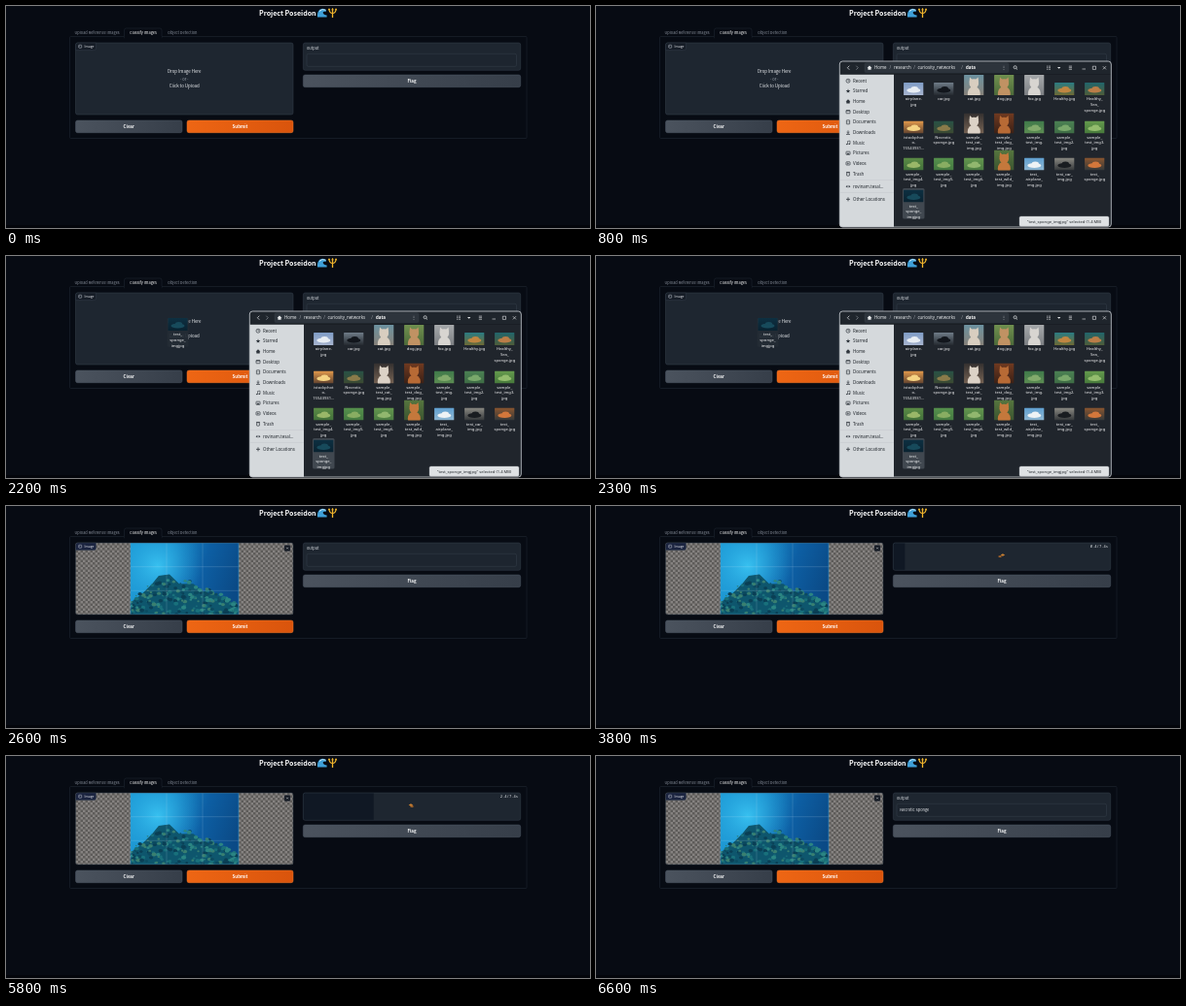
An HTML page with a canvas for the animation above (8.5 s loop, 600 by 229 pixels).

```html
<!DOCTYPE html>
<html lang="en">
<head>
<meta charset="utf-8">
<title>Project Poseidon</title>
<style>
html, body { margin: 0; width: 100%; height: 100%; overflow: hidden; background: #070b13; }
canvas { display: block; width: 600px; height: 229px; }
</style>
</head>
<body>
<canvas id="stage"></canvas>
<script>
const W = 600, H = 229, LOOP = 8500;
const canvas = document.getElementById('stage');
const dpr = window.devicePixelRatio || 1;
canvas.width = W * dpr;
canvas.height = H * dpr;
const c = canvas.getContext('2d');

const UI = '"Noto Sans CJK JP", "Noto Sans CJK SC", "Noto Sans", sans-serif';
const SYS = '"Noto Sans", "Open Sans", sans-serif';

const OPEN = 800, DRAG = 1700, HOVER = 2200, DROP = 2500, RUN = 3400, DONE = 6600, ETA = 7.4;

function rng(seed) {
  return () => (seed = (seed * 16807) % 2147483647) / 2147483647;
}

function text(s, x, y, size, color, { align = 'left', weight = 400, font = UI } = {}) {
  c.font = `${weight} ${size}px ${font}`;
  c.textAlign = align;
  c.fillStyle = color;
  c.fillText(s, x, y + size * 0.36);
}

function box(x, y, w, h, r, fill, stroke, lw = 0.5) {
  c.beginPath();
  c.roundRect(x, y, w, h, r);
  if (fill) { c.fillStyle = fill; c.fill(); }
  if (stroke) { c.strokeStyle = stroke; c.lineWidth = lw; c.stroke(); }
}

function poly(points, fill) {
  c.beginPath();
  points.forEach(([x, y]) => c.lineTo(x, y));
  c.closePath();
  c.fillStyle = fill;
  c.fill();
}

function line(points, color, lw = 0.6) {
  c.beginPath();
  points.forEach(([x, y], i) => i ? c.lineTo(x, y) : c.moveTo(x, y));
  c.strokeStyle = color;
  c.lineWidth = lw;
  c.stroke();
}

function disc(x, y, rx, ry, fill) {
  c.beginPath();
  c.ellipse(x, y, rx, ry, 0, 0, Math.PI * 2);
  c.fillStyle = fill;
  c.fill();
}

function ring(x, y, r, color, lw = 0.6) {
  c.beginPath();
  c.arc(x, y, r, 0, Math.PI * 2);
  c.strokeStyle = color;
  c.lineWidth = lw;
  c.stroke();
}

function shade(x0, y0, x1, y1, ...stops) {
  const g = c.createLinearGradient(x0, y0, x1, y1);
  stops.forEach((s, i) => g.addColorStop(i / (stops.length - 1), s));
  return g;
}

function clipped(x, y, w, h, r, draw) {
  c.save();
  c.beginPath();
  c.roundRect(x, y, w, h, r);
  c.clip();
  draw();
  c.restore();
}

function button(label, x, y, w, h, from, to, edge) {
  box(x, y, w, h, 2, shade(x, y, x + w, y + h, from, to), edge);
  text(label, x + w / 2, y + h / 2, 4.4, '#fff', { align: 'center', weight: 600 });
}

function wave(x, y) {
  c.beginPath();
  c.moveTo(x, y + 9);
  c.bezierCurveTo(x - 0.5, y + 2, x + 4, y - 1, x + 8.2, y + 1.6);
  c.bezierCurveTo(x + 9.6, y + 2.6, x + 9, y + 4.5, x + 7.6, y + 3.8);
  c.bezierCurveTo(x + 5, y + 3, x + 4.6, y + 7, x + 9.6, y + 7.4);
  c.lineTo(x + 9.6, y + 9.6);
  c.lineTo(x, y + 9.6);
  c.closePath();
  c.fillStyle = '#3f9fd8';
  c.fill();
  c.beginPath();
  c.moveTo(x + 2, y + 3.4);
  c.quadraticCurveTo(x + 4.5, y + 0.4, x + 8.4, y + 2.2);
  c.strokeStyle = '#d5f0fb';
  c.lineWidth = 0.9;
  c.stroke();
}

function trident(x, y) {
  const gold = '#f0b42c';
  line([[x, y + 0.5], [x, y + 10]], gold, 1.3);
  c.beginPath();
  c.moveTo(x - 3.5, y + 1);
  c.bezierCurveTo(x - 3.8, y + 7, x + 3.8, y + 7, x + 3.5, y + 1);
  c.strokeStyle = gold;
  c.lineWidth = 1.2;
  c.stroke();
  for (const d of [-3.5, 0, 3.5])
    poly([[x + d - 1.3, y + 2.2], [x + d, y], [x + d + 1.3, y + 2.2]], gold);
}

function page() {
  c.fillStyle = '#070b13';
  c.fillRect(0, 0, W, H);
  c.fillStyle = '#04060b';
  c.fillRect(0, 226, W, 3);

  text('Project Poseidon', 260, 7, 7.05, '#fff', { weight: 600 });
  wave(320, 2);
  trident(335.5, 2);

  const edge = '#222b36';
  box(65.5, 31.5, 469.5, 105, 1, null, edge);
  box(121.5, 23, 38.5, 10, [2, 2, 0, 0], '#070b13', edge);
  c.fillStyle = '#070b13';
  c.fillRect(121.8, 31, 37.9, 3);
  text('Upload Reference Images', 70.5, 27.3, 3.92, '#8b929e');
  text('Classify Images', 127, 27.3, 3.92, '#fff');
  text('Object Detection', 166, 27.3, 3.92, '#8b929e');

  button('Clear', 71.5, 118, 109.5, 12.7, '#4b535e', '#363e49', '#4b5563');
  button('Submit', 186, 118, 109, 12.7, '#ee6614', '#d9540c', '#f07828');
  button('Flag', 305.3, 71, 223.4, 12.7, '#4b535e', '#363e49', '#4b5563');
}

function chip(fill) {
  box(71.7, 38, 20.8, 7.6, [2, 0, 2, 0], fill, '#39434f', 0.4);
  box(74.7, 40.2, 3, 3, 0.5, null, '#c8ced8', 0.5);
  disc(75.7, 41.2, 0.4, 0.4, '#c8ced8');
  text('Image', 80.6, 41.8, 3.4, '#e5e7eb');
}

function dropZone() {
  box(71.5, 38, 223.5, 74, 2, '#1e2630', '#36404c');
  chip('#161d27');
  ['Drop Image Here', '- or -', 'Click to Upload'].forEach((s, i) =>
    text(s, 183.2, 67.7 + i * 7.5, i === 1 ? 4 : 4.4, i === 1 ? '#a3abb5' : '#eef0f3', { align: 'center' }));
}

function reef(x, y, w, h, seed) {
  c.fillStyle = shade(x, y, x + w, y + h * 0.5, '#1c9bd6', '#1b92cf', '#0d5fa4', '#0b4a86');
  c.fillRect(x, y, w, h);
  const glow = c.createRadialGradient(x + w * 0.25, y + h * 0.32, 0, x + w * 0.25, y + h * 0.32, w * 0.42);
  glow.addColorStop(0, 'rgba(60,200,245,.85)');
  glow.addColorStop(1, 'rgba(40,160,220,0)');
  c.fillStyle = glow;
  c.fillRect(x, y, w, h);
  poly([[0, 1], [0, 0.83], [0.1, 0.72], [0.2, 0.57], [0.26, 0.46], [0.36, 0.44], [0.45, 0.57],
    [0.58, 0.57], [0.68, 0.68], [0.82, 0.74], [1, 0.87], [1, 1]]
    .map(([u, v]) => [x + u * w, y + v * h]), '#0e566d');
  const rand = rng(seed), tones = ['#0a3f55', '#19707b', '#2b8583', '#0c4a60', '#397f70'];
  for (let i = 0; i < 210; i++) {
    const u = rand(), top = 0.49 + 1.3 * (u - 0.32) ** 2 * (u < 0.32 ? 2.4 : 0.65);
    const v = top + rand() * (1 - top), r = w * (0.008 + rand() * 0.015);
    disc(x + u * w, y + v * h, r, r * 0.8, tones[Math.floor(rand() * tones.length)]);
  }
}

function loadedImage() {
  clipped(71.5, 38, 223.5, 74, 2, () => {
    c.fillStyle = '#5d5b59';
    c.fillRect(71, 38, 225, 75);
    c.fillStyle = '#858280';
    const s = 2.5;
    for (let j = 0; j < 30; j++)
      for (let i = j % 2; i < 90; i += 2) c.fillRect(71.5 + i * s, 38 + j * s, s, s);
    clipped(128, 38, 111, 74, 0, () => reef(128, 38, 111, 74, 77));
    const guide = 'rgba(205,230,240,.4)';
    for (const k of [1, 2]) {
      line([[128 + 37 * k, 38], [128 + 37 * k, 112]], guide, 0.4);
      line([[128, 38 + 24.67 * k], [239, 38 + 24.67 * k]], guide, 0.4);
    }
    box(128, 38, 111, 74, 0, null, '#3b9fd0', 0.5);
  });
  box(71.5, 38, 223.5, 74, 2, null, '#36404c');
  chip('#1b2440');
  box(286, 40.5, 6, 6, 1, '#10151e', '#3d4652', 0.4);
  line([[288, 42.5], [290, 44.5]], '#dfe3e8', 0.5);
  line([[290, 42.5], [288, 44.5]], '#dfe3e8', 0.5);
}

function output(value) {
  box(305.3, 38, 223.4, 28.3, 2, '#1e2630', '#36404c');
  text('output', 309, 43.7, 3.92, '#e1e4e9');
  box(309, 49.3, 215.5, 13, 1.5, '#1d252f', '#36404c');
  if (value) text(value, 312.3, 55.7, 3.92, '#f0f2f5');
}

function loader(x, y, s) {
  const poses = [[1.4, 0.9], [-1.4, 0.9], [-1.4, 0], [1.4, 0]];
  const step = s / 0.45, n = Math.floor(step);
  const a = poses[(n + 3) % 4], b = poses[n % 4];
  const e = 1 - (1 - (step - n)) ** 3;
  const dx = a[0] + (b[0] - a[0]) * e, dy = a[1] + (b[1] - a[1]) * e;
  const tile = (px, py, fill) =>
    poly([[px - 2.3, py], [px, py - 1.2], [px + 2.3, py], [px, py + 1.2]], fill);
  tile(x - dx, y + 1.7 - dy, '#a7652a');
  tile(x + dx, y - 1.7 + dy, '#d18432');
}

function progress(s) {
  box(305.3, 38, 223.4, 28.3, 2, '#1e2630');
  clipped(305.3, 38, 223.4, 28.3, 2, () => {
    c.fillStyle = '#101824';
    c.fillRect(305.3, 38, 223.4 * s / ETA, 28.3);
  });
  box(305.3, 38, 223.4, 28.3, 2, null, '#36404c');
  text(`${s.toFixed(1)}/${ETA}s`, 526, 41.8, 3.8, '#e3e6ea',
    { align: 'right', font: '"Noto Sans Mono", "DejaVu Sans Mono", monospace' });
  loader(416.5, 51.3, s);
}

// label lines, top colour, bottom colour, subject colour, tall
const files = [
  ['airplane.|jpg', '#7f9cc6', '#a8b5cf', '#e8edf3'],
  ['car.jpg', '#6f7c88', '#252a30', '#12161c'],
  ['cat.jpg', '#6c92a0', '#88827a', '#d8cec0', 1],
  ['dog.jpg', '#70904f', '#4d6b3a', '#c09263', 1],
  ['fox.jpg', '#a6a9ab', '#7c7f83', '#d8d5d1', 1],
  ['Healthy.jpg', '#2a7c83', '#6d6a35', '#c08642'],
  ['Healthy_|Sea_|sponge.jpg', '#21666c', '#4e5c3a', '#ba7d48'],
  ['istockphot|o-|15543931...', '#e39a4b', '#62432f', '#f5d382'],
  ['Necrotic_|sponge.jpg', '#285246', '#3c4a32', '#8a7b4a'],
  ['sample_|test_cat_|img.jpg', '#34302f', '#756253', '#dcd2c6', 1],
  ['sample_|test_dog_|img.jpg', '#713a20', '#3a2016', '#b76a35', 1],
  ['sample_|test_img.|jpg', '#3f7a4a', '#5c8c52', '#82ab6c'],
  ['sample_|test_img2.|jpg', '#4b8153', '#3e6c45', '#79a86b'],
  ['sample_|test_img3.|jpg', '#659b4d', '#477a3b', '#93bd6d'],
  ['sample_|test_img4.|jpg', '#5c8c46', '#41703a', '#99b768'],
  ['sample_|test_img5.|jpg', '#56914d', '#447a41', '#88ad62'],
  ['sample_|test_img6.|jpg', '#64974f', '#4b7c42', '#91b76e'],
  ['sample_|test_wild_|img.jpg', '#56763f', '#3b5430', '#c4783c', 1],
  ['test_|airplane_|img.jpg', '#5f9fd0', '#8fb7d2', '#eef2f5'],
  ['test_car_|img.jpg', '#8b8a83', '#34373a', '#191c20'],
  ['test_|sponge.jpg', '#8c562f', '#33383a', '#d3773b'],
  ['test_|sponge_|imgjpg', '#0d3042', '#0a2230', '#174a5b']
];
const rowBase = [92, 131.5, 169.5, 202.5];

function fileIcon([label, top, bottom, subject, tall], x, base) {
  const h = tall ? 21 : 13, w = 20.5, y = base - h;
  clipped(x - w / 2, y, w, h, 0.6, () => {
    c.fillStyle = shade(0, y, 0, base, top, bottom);
    c.fillRect(x - w / 2, y, w, h);
    if (tall) {
      disc(x, base - 2, 6.5, 7, subject);
      disc(x, y + 9, 4.8, 4.8, subject);
      for (const s of [-1, 1])
        poly([[x + s * 4.8, y + 8], [x + s * 4.3, y + 2.5], [x + s * 1, y + 5.5]], subject);
    } else {
      disc(x, y + 8, 7, 2.4, subject);
      disc(x + 1, y + 6, 3.6, 2, subject);
    }
  });
  label.split('|').forEach((s, i) =>
    text(s, x, base + 3.6 + i * 5.8, 4.15, '#f1f2f3', { align: 'center', font: SYS }));
}

function sideIcon(kind, x, y) {
  const ink = '#30363d';
  const strokeBox = () => box(x - 2, y - 1.6, 4, 3.2, 0.4, null, ink, 0.7);
  switch (kind) {
    case 'Recent':
      ring(x, y, 2, ink, 0.7);
      line([[x, y - 1.2], [x, y], [x + 1, y]], ink);
      break;
    case 'Starred':
      poly(Array.from({ length: 10 }, (_, i) => {
        const a = i * Math.PI / 5 - Math.PI / 2, r = i % 2 ? 1 : 2.4;
        return [x + r * Math.cos(a), y + r * Math.sin(a)];
      }), ink);
      break;
    case 'Home':
      poly([[x - 2.4, y], [x, y - 2.2], [x + 2.4, y], [x + 1.7, y], [x + 1.7, y + 2], [x - 1.7, y + 2], [x - 1.7, y]], ink);
      break;
    case 'Documents':
      box(x - 1.6, y - 2, 3.2, 4, 0.3, null, ink, 0.7);
      line([[x - 0.8, y], [x + 0.8, y]], ink, 0.4);
      break;
    case 'Downloads':
      line([[x, y - 2], [x, y + 1]], ink, 0.8);
      line([[x - 1.4, y - 0.3], [x, y + 1], [x + 1.4, y - 0.3]], ink, 0.7);
      line([[x - 2, y + 2], [x + 2, y + 2]], ink, 0.7);
      break;
    case 'Music':
      disc(x - 1.2, y + 1.5, 0.9, 0.7, ink);
      disc(x + 1.3, y + 1.1, 0.9, 0.7, ink);
      line([[x - 0.5, y + 1.4], [x - 0.5, y - 1.6], [x + 2, y - 2], [x + 2, y + 1]], ink);
      break;
    case 'Pictures':
      strokeBox();
      poly([[x - 1.5, y + 1.2], [x, y - 0.6], [x + 1.5, y + 1.2]], ink);
      break;
    case 'Videos':
      strokeBox();
      poly([[x - 0.7, y - 1], [x + 1, y], [x - 0.7, y + 1]], ink);
      break;
    case 'Trash':
      box(x - 1.4, y - 1.2, 2.8, 3.3, 0.4, null, ink, 0.7);
      line([[x - 2, y - 1.6], [x + 2, y - 1.6]], ink, 0.7);
      break;
    case 'Desktop':
      strokeBox();
      line([[x - 2, y - 1], [x + 2, y - 1]], ink, 0.8);
      break;
    case 'Other Locations':
      line([[x - 2, y], [x + 2, y]], ink, 0.8);
      line([[x, y - 2], [x, y + 2]], ink, 0.8);
      break;
    default:
      poly([[x - 2.4, y], [x - 0.6, y - 1.4], [x - 0.6, y + 1.4]], ink);
      poly([[x + 2.4, y], [x + 0.6, y - 1.4], [x + 0.6, y + 1.4]], ink);
  }
}

function header() {
  const ink = '#e9ebed', sys = { font: SYS };
  line([[260.3, 61.7], [258.3, 63.7], [260.3, 65.7]], ink, 0.7);
  line([[267.3, 61.7], [269.3, 63.7], [267.3, 65.7]], '#8b9198', 0.7);
  box(276, 58.8, 148, 9.8, 1.5, '#2d343c', '#3a424b', 0.4);
  poly([[278.6, 63.7], [281, 61.4], [283.4, 63.7], [282.6, 63.7], [282.6, 65.7], [279.4, 65.7], [279.4, 63.7]], ink);
  text('Home', 286, 63.8, 4.4, ink, sys);
  text('research', 306, 63.8, 4.4, ink, sys);
  text('curiosity_networks', 330.5, 63.8, 4.4, ink, sys);
  text('data', 380, 63.8, 4.4, '#fff', { font: SYS, weight: 700 });
  for (const x of [301.5, 326.3, 375.3]) text('/', x, 63.8, 4.4, '#a0a6ad', sys);
  for (const d of [-1.6, 0, 1.6]) {
    disc(419, 63.7 + d, 0.4, 0.4, ink);
    line([[485.8, 63.7 + d], [489, 63.7 + d]], ink);
    line([[463, 63.7 + d], [464.4, 63.7 + d]], ink);
    line([[465.2, 63.7 + d], [467, 63.7 + d]], ink);
  }
  ring(430.6, 63.2, 1.5, ink, 0.7);
  line([[431.7, 64.3], [433, 65.6]], ink, 0.7);
  poly([[474, 63], [477.4, 63], [475.7, 64.8]], ink);
  line([[499.5, 65], [503, 65]], ink);
  box(510.3, 62.2, 3.2, 3.2, 0, null, ink, 0.6);
  line([[520.8, 62.2], [524, 65.4]], ink);
  line([[524, 62.2], [520.8, 65.4]], ink);
}

function fileWindow() {
  box(250.3, 57, 279, 171, 3, '#20252c');
  clipped(250.3, 57, 279, 171, 3, () => {
    c.fillStyle = '#1f252c';
    c.fillRect(250, 57, 280, 13.5);
    c.fillStyle = '#d5d9dc';
    c.fillRect(250, 70.5, 56, 158);
    line([[250, 70.5], [530, 70.5]], '#14181d', 0.5);
  });
  box(250.3, 57, 279, 171, 3, null, '#b9bec3', 0.9);
  header();

  ['Recent', 'Starred', 'Home', 'Desktop', 'Documents', 'Downloads', 'Music', 'Pictures', 'Videos', 'Trash',
    'rovinam.tesal...', 'Other Locations'].forEach((s, i) => {
    const y = 77.2 + i * 10.65 + (i > 9 ? 2.5 * (i - 9) : 0);
    sideIcon(s, 259, y);
    text(s, 264, y, 4.4, '#23282e', { font: SYS });
  });
  line([[251, 179.6], [306, 179.6]], '#bcc1c5', 0.4);
  line([[251, 192.4], [306, 192.4]], '#bcc1c5', 0.4);

  box(315, 188, 22.5, 31.5, 1.5, '#414850');
  files.forEach((f, i) => fileIcon(f, 326.3 + (i % 7) * 31, rowBase[Math.floor(i / 7)]));

  box(435, 217, 92, 10.3, 1.5, '#dfe2e4', '#a4a9ae', 0.4);
  text('"test_sponge_imgjpg" selected (1.4 MB)', 481, 222.3, 4.15, '#20252a', { align: 'center', font: SYS });
}

function draggedFile(t) {
  const k = Math.min(1, (t - DRAG) / (HOVER - DRAG));
  const e = k * k * (3 - 2 * k);
  const x = 326.3 - 149.8 * e, base = 202.5 - 125.5 * e;
  box(x - 11, base - 13.3, 22, 30, 1, 'rgba(36,44,53,.93)');
  fileIcon(files[21], x, base);
}

function draw(now) {
  // the screen refreshes ten times a second
  const t = Math.floor((now % LOOP) / 100) * 100;
  c.setTransform(dpr, 0, 0, dpr, 0, 0);
  page();
  if (t < DROP) dropZone(); else loadedImage();
  if (t > RUN && t < DONE) progress((t - RUN) / 1000);
  else output(t >= DONE ? 'Necrotic Sponge' : '');
  if (t >= OPEN && t < DROP) fileWindow();
  if (t >= DRAG && t < DROP) draggedFile(t);
}

const start = performance.now();
function tick() {
  draw(performance.now() - start);
  requestAnimationFrame(tick);
}
tick();
</script>
</body>
</html>
```
